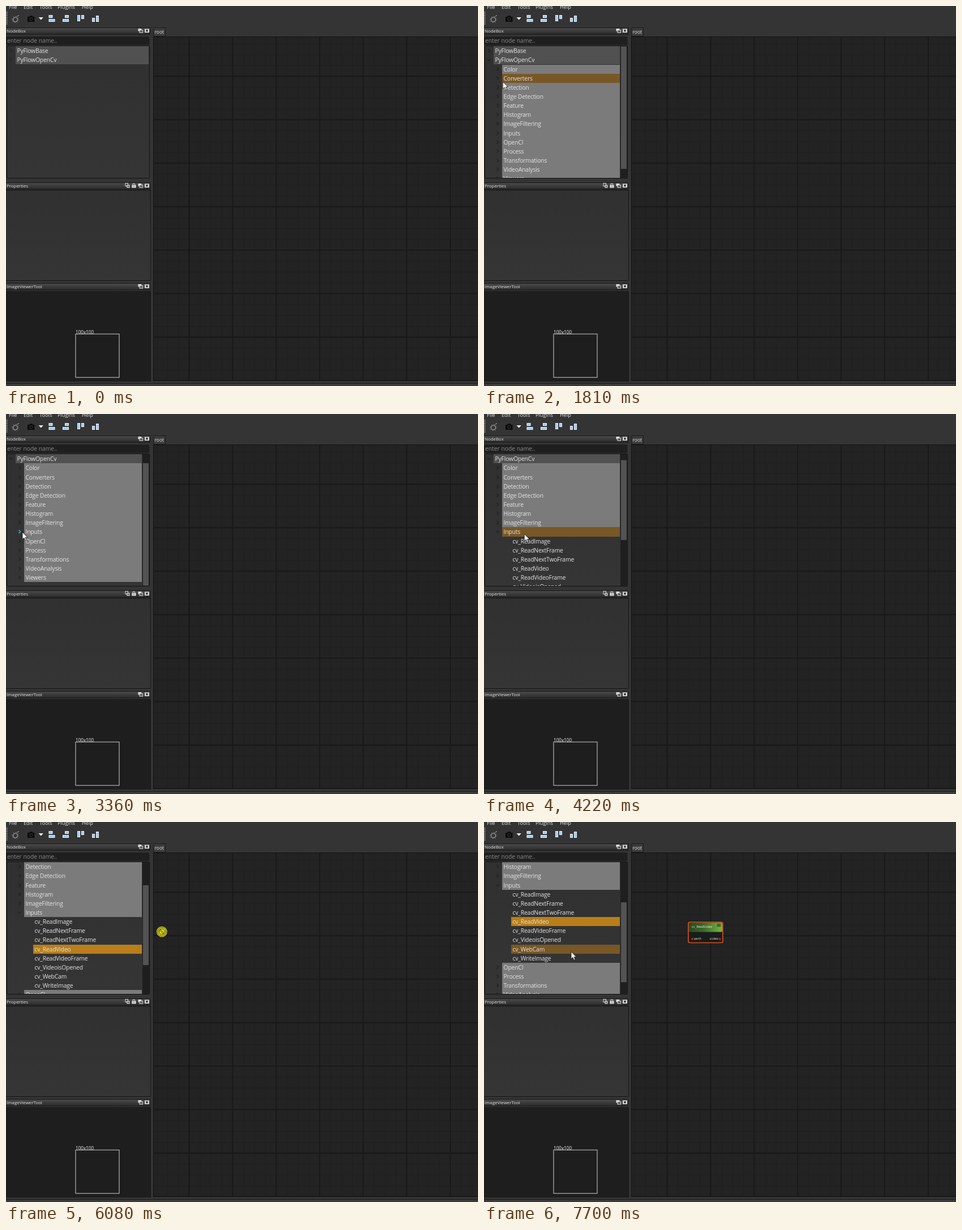
Recreate the animation shown at these times as an HTML page. Size 834 by 672 pixels, loop 8 s.

```html
<!DOCTYPE html>
<html lang="en">
<head>
<meta charset="utf-8">
<title>Node editor</title>
<style>
  html, body { margin: 0; width: 100%; height: 100%; overflow: hidden; background: #333; }
  #stage { position: relative; width: 834px; height: 672px; overflow: hidden; }
  #stage > svg { position: absolute; left: 0; top: 0; }
  text, .row { font-family: "Open Sans", "Noto Sans", sans-serif; fill: #e2e2e2; color: #e4e4e4; }
  .menu { font-size: 9.3px; letter-spacing: -.05px; }
  .title { font-size: 7.9px; }
  .node text { font: 5.1px "DejaVu Sans Mono", monospace; fill: #f0f0f0; }
  #tree { position: absolute; left: 2px; top: 71.2px; height: 232.8px; overflow: hidden; }
  .row { position: relative; height: 16.15px; font-size: 10.4px; line-height: 16px;
         letter-spacing: -.2px; white-space: pre; }
  .cell { height: 100%; padding-left: 2.5px; }
  .d0 > .cell { margin-left: 15px; background: #515151; }
  .d1 > .cell { margin-left: 30px; background: #7b7b7b; }
  .d2 > .cell { margin-left: 46px; }
  .row.hover > .cell { background: #785826; }
  .row.picked > .cell { background: #b97e19; }
  .row svg { position: absolute; top: 4px; width: 8px; height: 8px; fill: none; stroke: #202020; stroke-width: 1.3; }
  .row.open svg { transform: rotate(90deg); }
  .d0 svg { left: 3px; }
  .d1 svg { left: 18px; }
  .row.hot svg { stroke: #20b4e4; stroke-width: 1.6; }
  .kids { display: flex; flex-direction: column; justify-content: flex-end; height: 0; overflow: hidden; }
  .kids > div { flex: none; }
</style>
</head>
<body>
<div id="stage">
<svg width="834" height="672">
  <defs>
    <linearGradient id="bar" x2="0" y2="1"><stop stop-color="#4b4b4b"/><stop offset="1" stop-color="#2b2b2b"/></linearGradient>
    <linearGradient id="panel" x2="0" y2="1"><stop stop-color="#303030"/><stop offset="1" stop-color="#353535"/></linearGradient>
    <linearGradient id="head"><stop stop-color="#294a20"/><stop offset=".4" stop-color="#396528"/><stop offset="1" stop-color="#74b644"/></linearGradient>
    <pattern id="fine" x="323.5" y="124" width="19.22" height="19.22" patternUnits="userSpaceOnUse">
      <path d="M0 .5H20M.5 0V20" stroke="#1e1e1e"/>
    </pattern>
    <pattern id="coarse" x="322.6" y="123.2" width="76.9" height="76.9" patternUnits="userSpaceOnUse">
      <path d="M0 .9H77M.9 0V77" stroke="#171717" stroke-width="1.7"/>
    </pattern>
    <g id="float"><rect x="-4" y="-3.5" width="6" height="4.5" fill="#ddd"/><rect x="-1.5" y="-.8" width="5.7" height="4.4" fill="#555" stroke="#ddd"/></g>
    <g id="close"><rect x="-4" y="-3" width="8" height="6.5" fill="#ddd"/><path d="M-1.7-1.5L1.7 1.8M1.7-1.5L-1.7 1.8" stroke="#222" stroke-width="1.3"/></g>
    <g id="lock"><path d="M-2-1V-3.4H1.6V-1" fill="none" stroke="#ddd"/><rect x="-3.6" y="-1" width="7.2" height="5" fill="#ddd"/><path d="M0 .6V2.4" stroke="#222"/></g>
    <g id="copy"><rect x="-3.5" y="-4" width="4.5" height="5" fill="#444" stroke="#ddd"/><rect x="-1" y="-1" width="5" height="5" fill="#ddd"/><path d="M0 1.5H3M1.5 0V3" stroke="#333"/></g>
    <g id="bars" fill="#9cc8ee" stroke="#f2f6fa"><rect width="6" height="4"/><rect y="7" width="10" height="4"/></g>
  </defs>

  <rect width="834" height="672" fill="#343434"/>
  <g class="menu">
    <text x="5" y="5">File</text><text x="31" y="5">Edit</text><text x="59" y="5">Tools</text>
    <text x="91" y="5">Plugins</text><text x="134" y="5">Help</text>
  </g>

  <path d="M1.5 10V34" stroke="#c8c8c8" stroke-width="1.5" stroke-dasharray="1.5"/>
  <g fill="none" stroke="#b5b5b5">
    <circle cx="16.5" cy="24" r="4"/>
    <circle cx="16.5" cy="24" r="5.6" stroke-dasharray="1.4 3"/>
    <path d="M19.5 18.5L23 16.5"/>
  </g>
  <path d="M38 19H41.5L42.5 17H46.5L47.5 19H50.5V28H38Z" fill="#0b0b0b"/>
  <circle cx="44.3" cy="23.3" r="2.6" fill="none" stroke="#3c3c3c"/>
  <path d="M57.5 20H66L61.7 24.5Z" fill="#eee"/>
  <use href="#bars" x="76" y="16.5"/>
  <use href="#bars" transform="translate(110.5 16.5) scale(-1 1)"/>
  <use href="#bars" transform="translate(137.5 16.5) rotate(90)"/>
  <use href="#bars" transform="translate(152.5 27.5) rotate(-90)"/>

  <g class="title" id="docks"></g>
  <rect y="54" width="253.5" height="15" rx="1.5" fill="#1f1f1f"/>
  <text x="2" y="65.3" font-size="10.3" style="fill:#8c8c8c">enter node name..</text>
  <rect x="1.5" y="70.5" width="252" height="234" rx="1.5" fill="url(#panel)" stroke="#141414"/>

  <rect x="-1" y="325.5" width="256.5" height="160" fill="url(#panel)" stroke="#161616"/>
  <rect y="504" width="255" height="160" fill="#1e1e1e"/>
  <path d="M255.5 504V664" stroke="#141414"/>
  <rect x="123" y="580" width="77" height="76.8" fill="none" stroke="#cfcfcf"/>
  <text x="123" y="579.5" font-size="8.1" style="fill:#f2f2f2">100x100</text>

  <rect x="261" y="38.5" width="20.5" height="15" fill="#3c3c3c" stroke="#191919"/>
  <text x="262.5" y="49" font-size="8.5">root</text>
  <rect x="260.5" y="54.5" width="580" height="608" fill="#232323" stroke="#121212"/>
  <rect x="261" y="55" width="573" height="607" fill="url(#fine)"/>
  <rect x="261" y="55" width="573" height="607" fill="url(#coarse)"/>
  <path d="M0 667.5H834" stroke="#1b1b1b"/>
  <rect y="668" width="834" height="4" fill="#3a3a3a"/>

  <g id="scroll">
    <rect x="241" y="71" width="12" height="233" fill="#1f1f1f"/>
    <rect id="thumb" x="242" width="10" fill="#535353"/>
  </g>
</svg>

<div id="tree"><div id="list"></div></div>

<svg width="834" height="672">
  <g class="node" id="node">
    <rect x="361" y="177" width="61" height="36.5" rx="3" fill="#1b1b1b"/>
    <rect x="362" y="178" width="59" height="16.5" rx="2" fill="url(#head)"/>
    <rect x="361" y="177" width="61" height="36.5" rx="3" fill="none" stroke="#d2521a" stroke-width="1.7"/>
    <path d="M411.500 180.500h7m-7 2h7m-7 2h7" stroke="#1d3513" stroke-width="1.2"/>
    <text x="366.5" y="187.3">cv_ReadVideo</text>
    <text x="371.5" y="208.3">path</text>
    <text x="398.5" y="208.3">video</text>
    <path d="M367 205.5h2.5v2.5h-2.5zm48.500 0h2.500v2.500h-2.500z" fill="none" stroke="#b8443c"/>
  </g>
  <path id="arrow" d="M0 0V12.6L3 9.9 5 14.7 7.2 13.8 5.2 9.2H9.3Z" fill="#fff" stroke="#111" stroke-width=".8"/>
  <g id="drag" fill="none" stroke="#3b390c">
    <circle r="9.3" fill="#e3dc2c" stroke="none"/>
    <circle r="7.6"/>
    <circle r="5"/>
    <path d="M-5-3.5L3.5 5M-3.5-5L5 3.5"/>
  </g>
</svg>
</div>

<script>
const $ = id => document.getElementById(id);
const LOOP = 8000, TICK = 77, PITCH = 16.15, TOP = 71.2, VIEW = 14;
const OPEN_ROOT = 1430, OPEN_INPUTS = 3680, PRESS = 5930, DROP = 6310, RELEASE = 6540;

// Pointer moves: start, end, evenly timed way points
const moves = [
  [200, 970, "611,548 360,260 85,96"],
  [1050, 1280, "70,95 10,94"],
  [1430, 1660, "10,95"],
  [1740, 1970, "22,115 56,172"],
  [2120, 2280, "57,174"],
  [2430, 2430, "58,175"],
  [2750, 3130, "58,179 45,229"],
  [3210, 3510, "38,222 29,209 27,208"],
  [OPEN_INPUTS, 3910, "27,208"],
  [3987, 4370, "36,209 70,212 76,213"],
  [4540, 4760, "77,213 81,212"],
  [5010, 5780, "82,213 106,227"],
  [PRESS, DROP, "106,227 258,198 345,178 360,176"],
  [RELEASE, 7310, "358,176 265,206 165,245 154,239"],
  [7390, 7470, "154,234 154,229.5"],
  [7700, 7700, "154,229.5"]
].map(([start, end, path]) => ({ start, end, path: path.split(" ").map(p => p.split(",").map(Number)) }));
const wheel = [[2120, 1], [4540, 4], [7700, 7]];

const cats = "Color,Converters,Detection,Edge Detection,Feature,Histogram,ImageFiltering,Inputs,OpenCl,Process,Transformations,VideoAnalysis,Viewers".split(",");
const inputs = "ReadImage,ReadNextFrame,ReadNextTwoFrame,ReadVideo,ReadVideoFrame,VideoisOpened,WebCam,WriteImage".split(",");

function dock(name, y, icons) {
  const marks = icons.map((id, i) => `<use href="#${id}" x="${249 - 11.5 * i}" y="${y + 5.5}"/>`).join("");
  $("docks").innerHTML += `<rect x="-1" y="${y}.5" width="255.5" height="11.5" fill="url(#bar)" stroke="#181818"/>
    <text x="1" y="${y + 9}">${name}</text>${marks}`;
}
dock("NodeBox", 38, ["close", "float"]);
dock("Properties", 312, ["close", "float", "lock", "copy"]);
dock("ImageViewerTool", 490, ["close", "float"]);

function addRow(parent, label, depth) {
  const el = document.createElement("div");
  el.className = "row d" + depth;
  el.innerHTML = (depth < 2 ? '<svg viewBox="0 0 8 8"><path d="M2.5 1L5.5 4 2.5 7"/></svg>' : "") +
    `<div class="cell">${label}</div>`;
  parent.append(el);
  return { el, depth };
}
function addKids(parent) {
  const box = document.createElement("div"), inner = document.createElement("div");
  box.className = "kids";
  box.append(inner);
  parent.append(box);
  return { box, inner };
}

const base = addRow($("list"), "PyFlowBase", 0);
const root = addRow($("list"), "PyFlowOpenCv", 0);
const rootKids = addKids($("list"));
let inputKids, inputRow;
const catRows = cats.map(name => {
  const row = addRow(rootKids.inner, name, 1);
  if (name === "Inputs") {
    inputRow = row;
    inputKids = addKids(rootKids.inner);
  }
  return row;
});
const leafRows = inputs.map(name => addRow(inputKids.inner, "cv_" + name, 2));
const allRows = [base, root, ...catRows, ...leafRows];

function pointer(t) {
  const move = moves.filter(m => m.start <= t).pop();
  if (!move) return null;
  const { start, end, path } = move;
  const last = Math.round((end - start) / TICK), step = last ? (end - start) / last : 0;
  const k = last ? Math.min(last, Math.floor((t - start) / step + 0.1)) : 0;
  const u = last ? k / last * (path.length - 1) : 0;
  const i = Math.floor(u), a = path[i], b = path[i + 1] || a;
  const mix = c => a[c] + (b[c] - a[c]) * (u - i);
  return { x: mix(0), y: mix(1), time: start + k * step };
}

// Quadratic in-out over 250 ms
function unfold(t, start) {
  const p = Math.max(0, Math.min(1, (t - start) / 250));
  return p < 0.5 ? 2 * p * p : 1 - 2 * (1 - p) * (1 - p);
}

function setOpen(row, kids, isOpen, height) {
  kids.box.style.height = height + "px";
  row.el.classList.toggle("open", isOpen);
}

function draw(t) {
  const pos = pointer(t), now = pos ? pos.time : 0;
  const rootOpen = now >= OPEN_ROOT, inputsOpen = now >= OPEN_INPUTS;
  const a = unfold(now, OPEN_ROOT), b = unfold(now, OPEN_INPUTS);
  const inputHeight = b * inputs.length * PITCH;
  setOpen(inputRow, inputKids, inputsOpen, inputHeight);
  setOpen(root, rootKids, rootOpen, a * cats.length * PITCH + inputHeight);

  const hasBar = a === 1, right = hasBar ? 240 : 251.5;
  const top = wheel.reduce((s, [at, row]) => now >= at ? row : s, 0);
  $("tree").style.width = right - 2 + "px";
  $("list").style.marginTop = -top * PITCH + "px";

  const rows = [base, root];
  if (rootOpen) {
    rows.push(...catRows);
    if (inputsOpen) rows.splice(rows.indexOf(inputRow) + 1, 0, ...leafRows);
  }

  $("scroll").style.display = hasBar ? "" : "none";
  if (hasBar) {
    const total = b === 1 ? rows.length : 2 + cats.length, len = 232 * VIEW / total;
    $("thumb").setAttribute("y", 71.5 + top * (232 - len) / (total - VIEW));
    $("thumb").setAttribute("height", len);
  }

  const dragging = now >= PRESS && now < RELEASE;
  const at = pos && !dragging && pos.x < right ? rows[Math.floor((pos.y - TOP) / PITCH) + top] : null;
  for (const row of allRows) {
    const left = [17, 32, 48][row.depth], over = row === at;
    row.el.classList.toggle("hover", over && pos.x >= left);
    row.el.classList.toggle("hot", over && pos.x < left && pos.x > left - 15);
  }
  leafRows[3].el.classList.toggle("picked", now >= PRESS);

  $("node").style.display = now >= DROP - 1 ? "" : "none";
  $("arrow").style.display = pos && !dragging ? "" : "none";
  $("drag").style.display = dragging ? "" : "none";
  if (pos) $(dragging ? "drag" : "arrow").setAttribute("transform", `translate(${pos.x} ${pos.y})`);
}

const begin = performance.now();
function tick() {
  draw((performance.now() - begin) % LOOP);
  requestAnimationFrame(tick);
}
tick();
</script>
</body>
</html>
```
